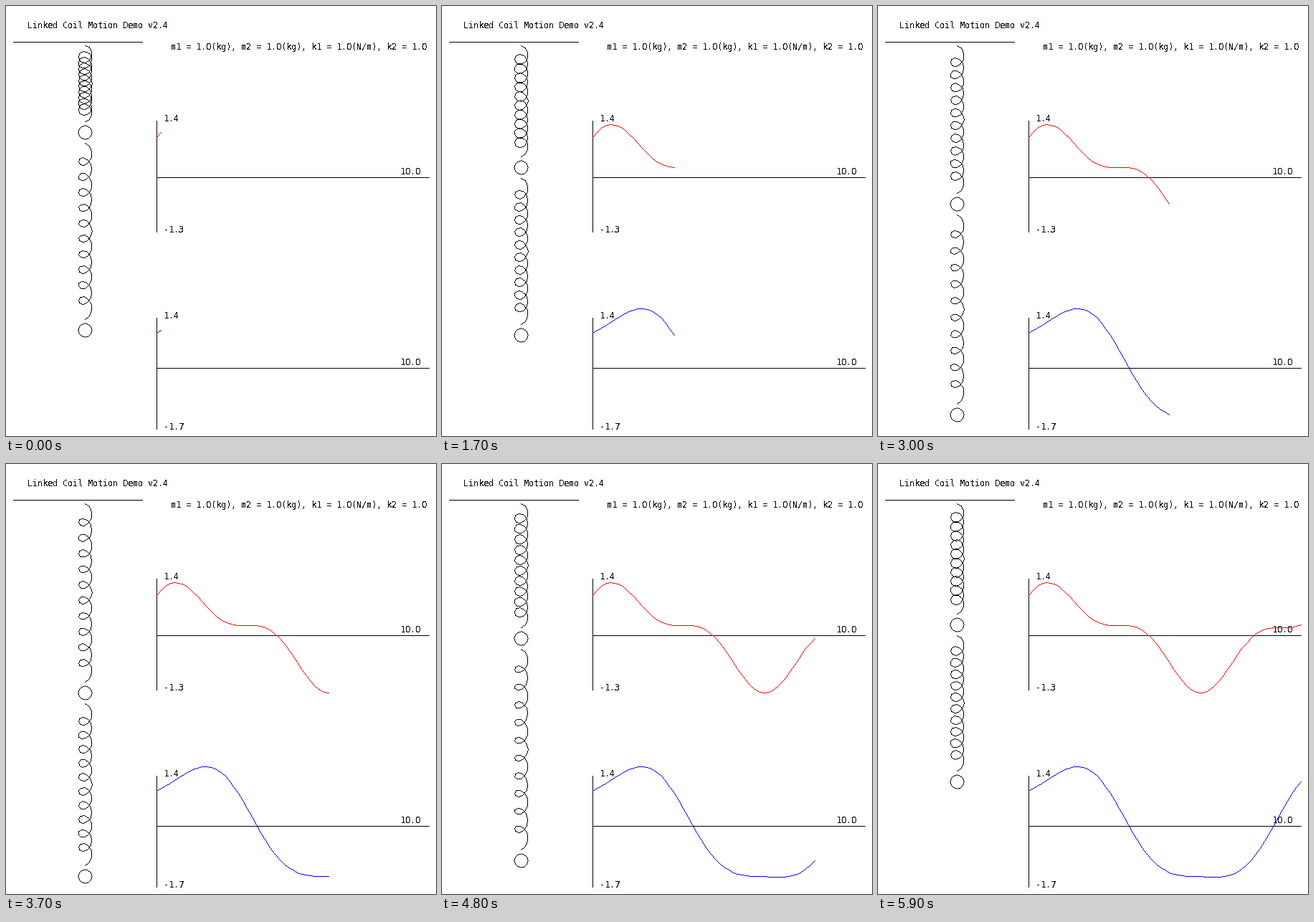
Recreate the animation shown at these times as a matplotlib script. Size 600 px wide and 600 px high, loop 6 s.

```python
import numpy as np
import matplotlib.pyplot as plt
from matplotlib.animation import FuncAnimation

SIZE, DPI = 600, 100
FRAMES, INTERVAL = 60, 100
T_END = 10.0

BLACK, RED, BLUE = (0, 0, 0, 255), (255, 0, 0, 255), (0, 0, 255, 255)
SPRING_X = 110          # centre line of springs and masses
RADIUS = 10             # of the coils and of the masses
GAP = 15                # from a mass centre to the spring end
LEFT, RIGHT = 210, 590  # time axis
HEIGHT = 155            # of each plot

plt.rcParams["text.hinting_factor"] = 1


# Two equal masses on two equal springs: sum of a slow and a fast mode.
def heights(t):
    golden = (1 + 5 ** 0.5) / 2
    slow_amp = golden / 5 ** 0.5
    fast_amp = 1 - slow_amp
    slow = slow_amp * (np.cos(t / golden) + np.sin(t / golden))
    fast = fast_amp * (np.cos(t * golden) + np.sin(t * golden))
    return slow + fast, golden * slow - fast / golden


# Pixel-crisp drawing on an RGBA canvas
def polyline(canvas, xs, ys, color):
    for x0, y0, x1, y1 in zip(xs[:-1], ys[:-1], xs[1:], ys[1:]):
        n = max(abs(x1 - x0), abs(y1 - y0)) + 1
        col = np.floor(np.linspace(x0, x1, n) + 0.5).astype(int)
        row = np.floor(np.linspace(y0, y1, n) + 0.5).astype(int)
        canvas[row, col] = color


def circle(canvas, cx, cy, steps=36):
    angle = 2 * np.pi * np.arange(steps + 1) / steps
    xs = cx + (RADIUS * np.cos(angle)).astype(int)
    ys = cy + (RADIUS * np.sin(angle)).astype(int)
    polyline(canvas, xs, ys, BLACK)


def spring(canvas, top, bottom, turns=10.5, steps=100):
    part = np.arange(steps + 1) / steps
    angle = 2 * np.pi * turns * part
    xs = SPRING_X + (RADIUS * np.sin(angle)).astype(int)
    ys = top + RADIUS * (1 - np.cos(angle)) + (bottom - top - 2 * RADIUS) * part
    polyline(canvas, xs, (ys + 1e-9).astype(int), BLACK)


class Plot:
    def __init__(self, u, top, color):
        self.top, self.color = top, color
        self.low, self.high = -u.max(), -u.min()
        scale = (HEIGHT - 1) / (self.high - self.low)
        self.zero = int(top + scale * self.high)
        self.ys = self.zero - np.floor(scale * u).astype(int)

    def draw_axes(self, canvas):
        polyline(canvas, (LEFT, LEFT), (self.top, self.top + HEIGHT), BLACK)
        polyline(canvas, (LEFT, RIGHT), (self.zero, self.zero), BLACK)

    def draw_labels(self):
        label(220, self.top - 10, f"{self.high:.1f}")
        label(220, self.top + HEIGHT - 10, f"{self.low:.1f}")
        label(550, self.zero - 15, f"{T_END:.1f}")


def label(x, y, text):
    # The letter O stands in for a zero without an inner mark.
    ax.text(x, y + 11, text.replace("0", "O"), family="DejaVu Sans Mono",
            size=11.627 * 72 / DPI, color="black", ha="left", va="baseline",
            antialiased=False, zorder=1)


fig = plt.figure(figsize=(SIZE / DPI, SIZE / DPI), dpi=DPI, facecolor="white")
ax = fig.add_axes([0, 0, 1, 1])
ax.set_axis_off()

times = np.linspace(0, T_END, FRAMES + 1)
xs = (LEFT + (RIGHT - LEFT) * times / T_END + 1e-9).astype(int)
u1, u2 = heights(times)
plots = Plot(u1, 160, RED), Plot(u2, 435, BLUE)

base = np.zeros((SIZE, SIZE, 4), dtype=np.uint8)
polyline(base, (10, 190), (50, 50), BLACK)
for plot in plots:
    plot.draw_axes(base)
    plot.draw_labels()

label(30, 20, "Linked Coil Motion Demo v2.4")
label(230, 50, "m1 = 1.0(kg), m2 = 1.0(kg), k1 = 1.0(N/m), k2 = 1.0")

image = ax.imshow(base, extent=(0, SIZE, SIZE, 0), aspect="auto",
                  interpolation="nearest", zorder=2)
ax.set_xlim(0, SIZE)
ax.set_ylim(SIZE, 0)


def update(i):
    canvas = base.copy()
    now = i + 1
    start = 55
    for plot in plots:
        y = int(plot.ys[now])
        spring(canvas, start, y - GAP)
        circle(canvas, SPRING_X, y)
        polyline(canvas, xs[:now + 1], plot.ys[:now + 1], plot.color)
        start = y + GAP
    image.set_data(canvas)
    return [image]


anim = FuncAnimation(fig, update, frames=FRAMES, interval=INTERVAL,
                     repeat=True, repeat_delay=0, blit=False)
plt.show()
```
